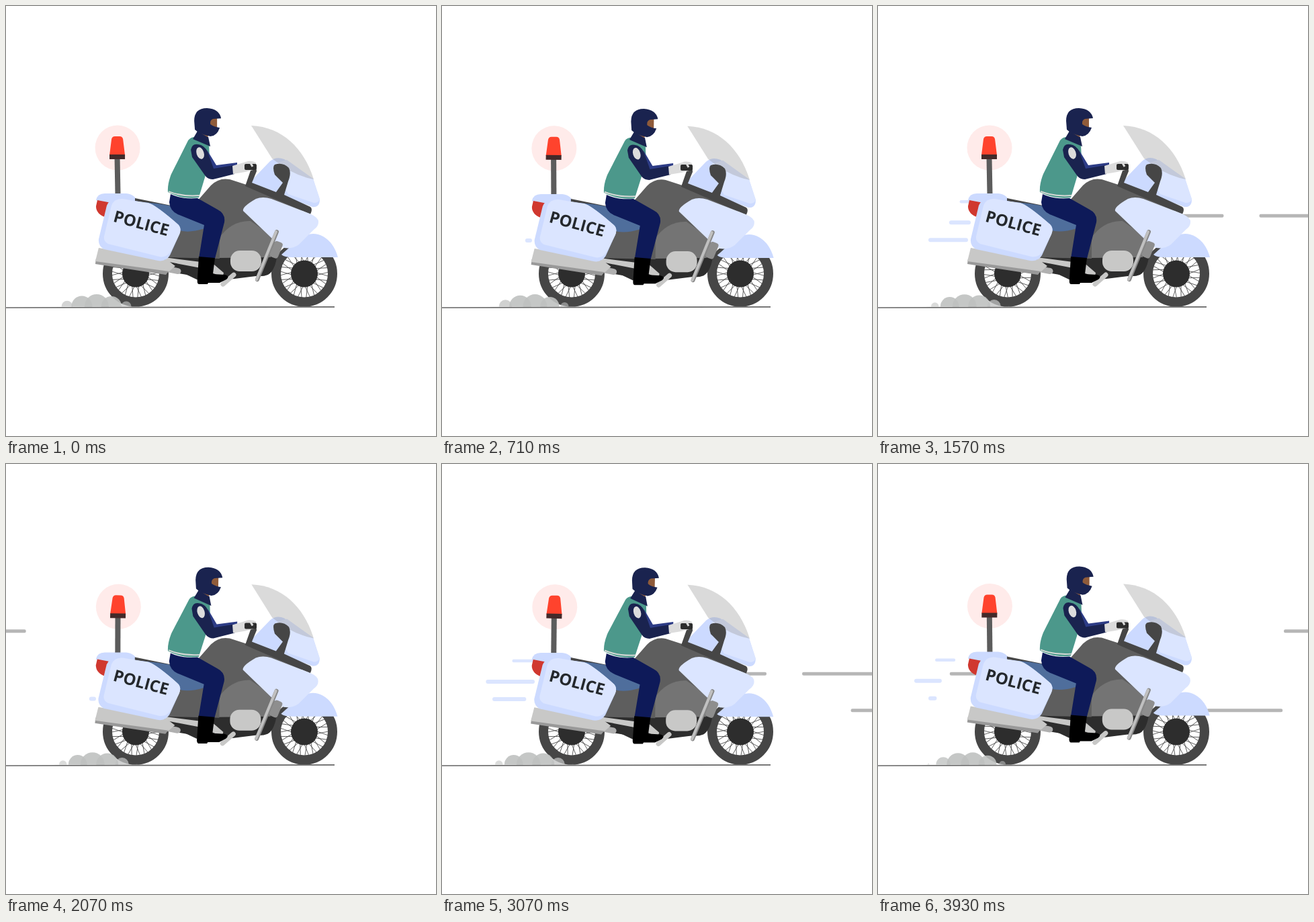
Recreate the animation shown at these times as an HTML page. Size 640 by 640 pixels, loop 4000 ms.

```html
<!DOCTYPE html>
<html>
<head>
<meta charset="utf-8">
<style>
  html, body { margin: 0; width: 100%; height: 100%; overflow: hidden; background: #fff; }
  svg { display: block; width: 100vw; height: 100vh; }
  .light { fill: #dbe5ff; }
  .pale { fill: #ccdaff; }
  .navy { fill: #1a234f; }
  .dark { fill: #464646; }
  .coal { fill: #2d2d2d; }
  .silver { fill: #c8c8c7; }
  text { font: bold 24px "Open Sans", sans-serif; fill: #24282c; }
</style>
</head>
<body>
<svg viewBox="0 0 640 640">
  <g id="streaks" fill="#b6b6b6"></g>
  <g id="trails" stroke="#dbe5ff" stroke-linecap="round"></g>
  <g id="wheels"></g>
  <g id="bike">
    <g id="beacon">
      <circle id="glow" cx="166" cy="211" r="33.5"/>
      <path d="M165.500 227L166.500 280" stroke="#5c5c5c" stroke-width="8"/>
      <path id="lamp" d="M157 198Q158 194 162 194H169Q173 194 174 198L177 222H154Z"/>
      <path id="base" d="M154 221H177V228H154Z"/>
    </g>
    <path class="pale" d="M134 289Q136 279 147 279H179Q192 280 197 293L150 297Z"/>
    <path fill="#d0382f" d="M136 289L157 293L147 314Q134 309 134 298Z"/>
    <path class="dark" d="M192 286L246 297V302L192 291Z"/>
    <path fill="#5e5e5e" d="M285 290L305 267Q317 255 333 258L364 268L442 303L402 346L395 376L244 377L232 350L250 325L290 330Z"/>
    <path class="coal" d="M236 371L393 372L401 360L404 368Q401 394 390 400Q383 403 372 402L340 406L318 408L246 396Z"/>
    <path fill="#747474" d="M316 375V347Q335 319 364 320L400 345L394 374Z"/>
    <path fill="#5e5e5e" d="M234 345L290 325L318 345V376L238 374Z"/>
    <path fill="#4f6e9c" d="M193 291L225 294L297 306L296 331Q270 339 256 333L220 300Z"/>
    <path class="silver" d="M236 374L290 381L310 385L324 397Q324 403 316 401L290 390L238 380Z"/>
    <path d="M246 386L286 405" stroke="#2d2d2d" stroke-width="5"/>
    <rect class="silver" x="334" y="364" width="46" height="31" rx="14"/>
    <path d="M238 391L256 394.500" stroke="#b0b0b0" stroke-width="9" stroke-linecap="round"/>
    <path fill="#999" d="M134 376L245 391L238 400L133 384Z"/>
    <path class="silver" d="M138 360L240 378L252 387L243 395L133 380Z"/>
    <path class="pale" d="M150 297Q155 285 170 287L212 293Q224 297 256 325Q262 331 258 340L244 371Q238 381 226 379L146 362Q137 357 138 347Z"/>
    <path class="light" d="M157 297Q161 286 174 287L214 294Q225 298 256 325Q262 331 258 340L246 364Q240 375 228 373L152 354Q145 350 146 343Z"/>
    <text transform="translate(158.500 320.500) rotate(15)">POLICE</text>

    <path class="pale" d="M410 370L438 345Q456 334 472 343Q488 352 494 374H426Q414 374 410 370Z"/>
    <path class="pale" d="M365 260L393 231Q402 223 414 228L457 257L467 288Q467 300 456 299L366 266Z"/>
    <path class="light" d="M404 249Q396 240 402 234L418 229L457 257L467 287Q466 293 458 293L420 280Z"/>
    <path fill="#969696" fill-opacity=".35" d="M365 178C412 180 444 213 458 258Q426 252 396 227Z"/>
    <path class="dark" d="M356 268L364 245Q373 238 373 246L366 263L402 277L412 263L400 251Q396 239 400 236Q412 232 421 241Q425 249 420 261L414 281L453 299Q457 302 453 310Z"/>
    <path class="light" d="M353 305Q351 299 372 287Q382 283 395 287L452 309Q466 315 465 322Q465 328 458 333L436 355Q427 362 414 360Q404 357 397 347Z"/>
    <rect x="396" y="350" width="13" height="25" rx="4" fill="#8e8e8e" transform="rotate(22 402 362)"/>
    <path d="M403 336L374 407" stroke="#888" stroke-width="6" stroke-linecap="round"/>
    <path d="M402 336L373 407" stroke="#c0c0c0" stroke-width="4" stroke-linecap="round"/>
    <path d="M323 414L339 400" stroke="#c8c8c7" stroke-width="7" stroke-linecap="round"/>

    <path fill="#0e1a59" d="M245 280Q262 288 285 286L315 303Q327 309 325 322L311 376H287L295 326L258 311Q244 306 243 292Z"/>
    <path d="M287 373L311 375L308 399L326 400Q334 402 328 407L318 412H301L300 414H287Q284 413 285 406Z"/>
    <g id="torso">
      <path fill="#4c988b" d="M271 200Q275 194 284 195L302 207L303 228L296 255L287 285Q262 288 241 277Q240 265 246 250Z"/>
      <path d="M242 276Q262 284 288 282" fill="none" stroke="#d5d9d5" stroke-width="2"/>
      <path class="navy" d="M285 186L301 195L304 209L278 198Z"/>
      <path fill="#8f5b3a" d="M288 182L302 190L300 195L286 187Z"/>
      <path fill="#8f5b3a" d="M302 167L314 166V181H304Z"/>
      <path class="navy" d="M280 171Q280 152 299 152Q317 153 320 167L308 168Q303 170 304 176Q309 180 318 181Q314 193 304 194Q288 191 281 184Z"/>
    </g>
    <g id="arm">
      <path fill="#2d3c86" d="M299 214L313 237L344 233V240L306 246Z"/>
      <path class="navy" d="M275 214Q277 204 286 206Q295 207 300 217L309 242L339 237L340 250L308 258Q300 258 296 252L277 225Z"/>
      <ellipse cx="289" cy="219" rx="5.500" ry="9" fill="#dcdcdc" transform="rotate(-18 289 219)"/>
    </g>
    <path fill="#dcdcdc" d="M337 238L357 232Q364 229 372 233V243L356 247L338 250Z"/>
    <rect class="coal" x="355" y="235" width="18" height="9" rx="2"/>
    <path d="M363 232L367 239" stroke="#dcdcdc" stroke-width="3"/>
  </g>
  <g id="dust" fill="#bfc1c0" clip-path="url(#ground)"></g>
  <clipPath id="ground"><path d="M0 400H300V447.500H0Z"/></clipPath>
  <path d="M0 449L489 447.800" stroke="#666" stroke-width="1.700"/>
</svg>
<script>
const LOOP = 4000;
const $ = id => document.getElementById(id);

function add(parent, tag, attrs = {}) {
  const el = document.createElementNS('http://www.w3.org/2000/svg', tag);
  set(el, attrs);
  parent.append(el);
  return el;
}
function set(el, attrs) {
  for (const name in attrs) el.setAttribute(name, attrs[name]);
}
const mod = (a, n) => ((a % n) + n) % n;
// Time within a repeating cycle, or -1 before its first start.
const cycle = (t, delay, period) => t < delay ? -1 : (t - delay) % period;
// Linear move from a to b between two times.
const slide = (t, start, end, a, b) => a + (b - a) * Math.min(1, Math.max(0, (t - start) / (end - start)));

// Grey streaks: pairs of bars crossing the stage from right to left.
const rows = [
  { y: 246.3, gap: 143, delay: 200 },
  { y: 309.7, gap: 166, delay: 722 },
  { y: 364.2, gap: 144, delay: 85 }
];
for (const row of rows) {
  row.bars = [0, row.gap].map(() => add($('streaks'), 'rect', { y: row.y, width: 113, height: 5, rx: 2.3 }));
}

// Pale trails: the left end grows out, later the right end follows.
const trails = [
  { y: 291.3, w: 4.5, delay: 60, from: 140, to: 85, grow: 450, wait: 300, end: 679 },
  { y: 322.3, w: 6, delay: 100, from: 138, to: 54, grow: 290, wait: 295, end: 560 },
  { y: 348.3, w: 6, delay: 0, from: 134, to: 75, grow: 180, wait: 310, end: 590 }
];
for (const trail of trails) trail.el = add($('trails'), 'path', { 'stroke-width': trail.w });

const wheels = [193, 444].map(x => {
  const g = add($('wheels'), 'g', { transform: `translate(${x} 398.5)` });
  add(g, 'circle', { r: 42, fill: 'none', stroke: '#464646', 'stroke-width': 14 });
  const spin = add(g, 'g', { stroke: '#464646', 'stroke-width': .8 });
  for (let a = 0; a < 360; a += 20) {
    add(spin, 'path', { d: 'M18 -2L36 3M18 2L36 -3', transform: `rotate(${a})` });
  }
  add(g, 'circle', { r: 20, class: 'coal' });
  return spin;
});

const puffs = Array.from({ length: 6 }, () => add($('dust'), 'circle', { cy: 447 }));

function draw(t) {
  // The suspension sinks and leans slightly, the rider sways forward.
  const dip = (1 - Math.cos(2 * Math.PI * (t + 20) / 400)) / 2;
  set($('bike'), { transform: `matrix(1 0 ${-.011 * dip} ${1 + .006 * dip} ${2.75 * dip} ${1.9 * dip})` });
  set($('beacon'), { transform: `rotate(${2.3 * dip} 166 279)` });
  set($('torso'), { transform: `rotate(${2.1 * dip} 265 285)` });
  set($('arm'), { transform: `translate(${14 * dip} 0) scale(${1 - .04 * dip} 1)` });

  const phase = t % 1000, blue = phase > 100 && phase < 550;
  set($('glow'), { fill: blue ? '#e5efff' : '#ffebea' });
  set($('lamp'), { fill: blue ? '#0060ff' : '#ff432d' });
  set($('base'), { fill: blue ? '#1f2a48' : '#432a2a' });

  for (const { gap, delay, bars } of rows) {
    const u = cycle(t, delay, 743);
    bars.forEach((bar, i) => set(bar, { x: u < 0 ? 640 : 640 - 2.25 * u + i * gap }));
  }
  for (const { y, w, delay, from, to, grow, wait, end, el } of trails) {
    const u = cycle(t, delay, 680);
    const left = slide(u, 0, grow, from, to) + w / 2;
    const right = slide(u, wait, end, from, to) - w / 2;
    set(el, { d: right > left ? `M${left} ${y + 3 * dip}H${right}` : '' });
  }
  for (const spin of wheels) set(spin, { transform: `rotate(${t * .9})` });

  // Puffs drift left, swelling and shrinking on the way.
  puffs.forEach((el, i) => {
    const x = 66 + i * 22 + mod(3 - .088 * t, 22);
    const r = Math.max(0, 18 * Math.cos(Math.PI / 2 * (x - 134) / 62));
    set(el, { cx: x, r, opacity: Math.min(.9, .35 + r / 25) });
  });
}

function frame(now) {
  draw(now % LOOP);
  requestAnimationFrame(frame);
}
draw(0);
requestAnimationFrame(frame);
</script>
</body>
</html>
```
